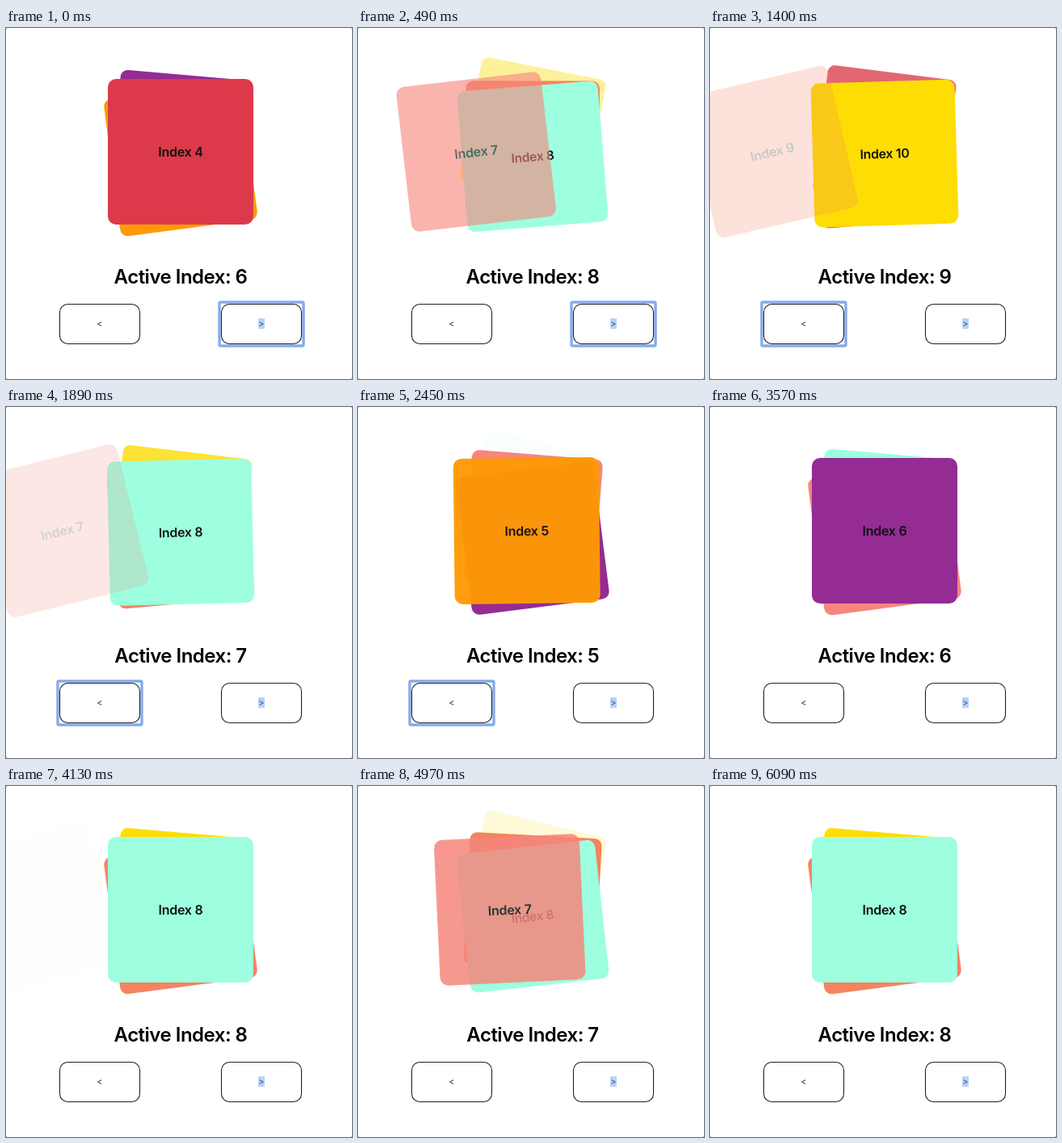
An HTML page for the animation above (6.3 s loop, 428 by 434 pixels).

```html
<!DOCTYPE html>
<html lang="en">
<head>
<meta charset="utf-8">
<title>Card stack</title>
<style>
  html, body { margin: 0; width: 100%; height: 100%; overflow: hidden; background: #888; }
  svg { display: block; width: 428px; height: 434px; }
  text { font-family: Inter, Roboto, sans-serif; text-anchor: middle; }
  .card { font-size: 16px; font-weight: 600; letter-spacing: -.25px; fill: #111; }
  .label { font-size: 24px; font-weight: 600; letter-spacing: -.5px; }
  .sign { font-size: 11px; fill: #333; }
  .button { fill: #fff; stroke: #222; stroke-width: 1.1; }
  .ring { fill: none; stroke: #86abeb; stroke-width: 3.4; }
</style>
</head>
<body>
<svg viewBox="0 0 428 434">
  <rect width="428" height="434" rx="2" fill="#fff"/>
  <g id="deck"></g>
  <text id="label" class="label" x="216" y="316"></text>
  <rect id="ringL" class="ring" x="64" y="339" width="104" height="54" rx="1.5"/>
  <rect id="ringR" class="ring" x="264" y="339" width="104" height="54" rx="1.5"/>
  <rect class="button" x="66.5" y="341.5" width="99" height="49" rx="10"/>
  <rect class="button" x="266.5" y="341.5" width="99" height="49" rx="10"/>
  <rect x="312" y="359" width="8" height="13" fill="#b8d4f6"/>
  <text class="sign" x="116" y="370">&lt;</text>
  <text class="sign" x="316" y="370" style="fill:#2b5488">&gt;</text>
</svg>
<script>
const LOOP = 6300, STEP = 70, EASE_MS = 250, FIRST = 4, START = 4;
const COLORS = ['#dc3a4a', '#ff9a05', '#942c94', '#f6867c',
                '#9dffdf', '#f4845f', '#fddd04', '#f25c54'];

// [time, active index] for each press
const PRESSES = [[0, 6], [190, 7], [370, 8], [760, 9], [980, 10], [1304, 9],
  [1560, 8], [1800, 7], [2030, 6], [2254, 5], [2990, 6], [3640, 7],
  [3900, 8], [4805, 7], [5280, 8]];

// Card pose at positions -1, 0, 1, 2, 3 relative to the active card
const POSE = {
  x: [-180, 0, 0, 0, 0],
  y: [0, 0, 9.5, -14, -34],
  turn: [-17, 0, -7.5, 5, 15],
  scale: [1, 1, .95, .9, .85],
  alpha: [0, 1, 1, 1, 0]
};

const $ = id => document.getElementById(id);
const ease = x => x < .5 ? 4 * x ** 3 : 1 - 4 * (1 - x) ** 3;

function pose(key, r) {
  const p = POSE[key], k = Math.min(3, Math.floor(r + 1)), f = r + 1 - k;
  return p[k] + (p[k + 1] - p[k]) * f;
}

// Each press eases from wherever the deck is at that moment
function state(t) {
  let from = START, active = START, pos = START;
  PRESSES.forEach(([at, to], i) => {
    if (at > t) return;
    const next = PRESSES[i + 1];
    const end = next ? Math.min(t, next[0]) : t;
    pos = from + (to - from) * ease(Math.min(1, (end - at) / EASE_MS));
    from = pos;
    active = to;
  });
  return { pos, active };
}

function add(parent, tag, attrs) {
  const el = document.createElementNS('http://www.w3.org/2000/svg', tag);
  for (const k in attrs) el.setAttribute(k, attrs[k]);
  return parent.appendChild(el);
}

// Lower indices lie on top, so build from the bottom up
const cards = [];
for (let i = 13; i >= FIRST; i--) {
  const g = add($('deck'), 'g', {});
  add(g, 'rect', { x: -90, y: -90, width: 180, height: 180, rx: 10,
    fill: COLORS[(i - FIRST) % COLORS.length] });
  add(g, 'text', { class: 'card', y: 6 }).textContent = 'Index ' + i;
  cards.push({ i, g });
}

function draw(t) {
  const { pos, active } = state(t);
  for (const { i, g } of cards) {
    const r = i - pos, shown = r > -1 && r < 3;
    g.style.display = shown ? '' : 'none';
    if (!shown) continue;
    g.setAttribute('transform', `translate(${216 + pose('x', r)} ${153 + pose('y', r)})` +
      ` rotate(${pose('turn', r)}) scale(${pose('scale', r)})`);
    g.setAttribute('opacity', pose('alpha', r));
  }
  $('label').textContent = 'Active Index: ' + active;
  $('ringR').style.display = t < 1304 ? '' : 'none';
  $('ringL').style.display = t >= 1304 && t < 2700 ? '' : 'none';
}

const begin = performance.now();
function tick() {
  const t = (performance.now() - begin) % LOOP;
  draw(Math.floor(t / STEP) * STEP);
  requestAnimationFrame(tick);
}
tick();
</script>
</body>
</html>
```
